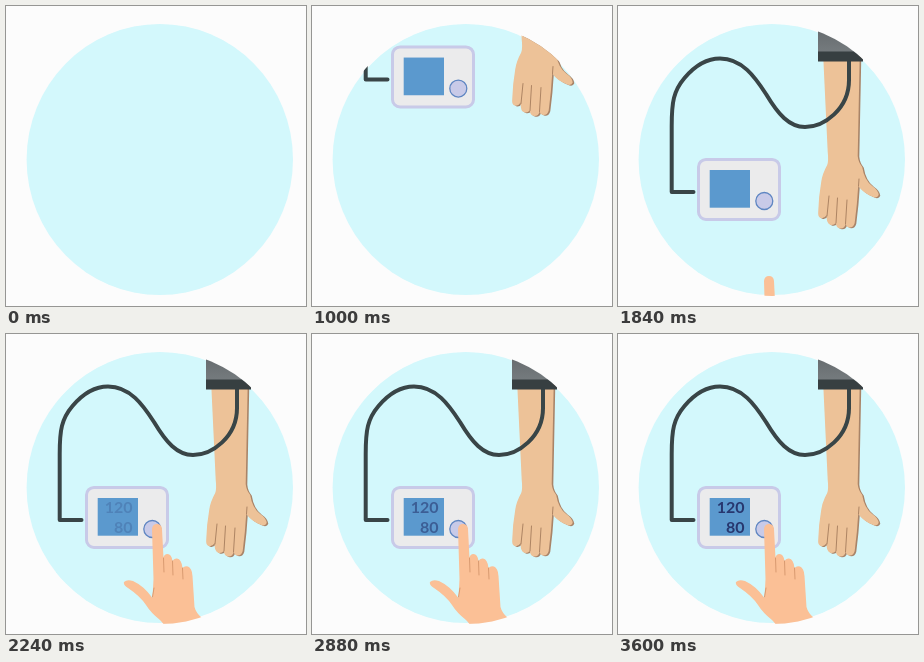
These frames come from a looping animation (300 by 300 pixels, 4 s). An HTML page:

```html
<!DOCTYPE html>
<html lang="en">
<head>
<meta charset="utf-8">
<title>Blood pressure</title>
<style>
  html, body { margin: 0; width: 100%; height: 100%; overflow: hidden; background: #fcfcfc; }
  svg { display: block; width: 100%; height: 100%; }
  text { font: bold 16px Lato, sans-serif; text-anchor: end; fill: #27376f; }
  .crease { fill: none; stroke-width: 1; stroke-linecap: round; }
</style>
</head>
<body>
<svg viewBox="0 0 300 300">
  <defs>
    <clipPath id="disc"><ellipse cx="153.800" cy="153.500" rx="134.500" ry="136.500"/></clipPath>
    <linearGradient id="sleeve" x2="0" y2="1">
      <stop stop-color="#575b5e"/><stop offset="1" stop-color="#757b7e"/>
    </linearGradient>
    <path id="arm" d="M206 50H242.500L240.500 150Q241 156 245 161Q247 174 255 180Q261 184 261.500 189Q260 193 255 190.500Q246 187 241 180Q240 198 237.500 217Q236 222 232 221.500Q229 221 228.500 218Q227 223 223 222.500Q219 222 218.500 217Q216 220 212.500 218.500Q209 217 209.500 209Q207 213 203.500 212Q200.500 211 201 206Q201.500 190 204 176Q205 168 210 159Q211.500 155 210.500 146Z"/>
  </defs>
  <ellipse cx="153.800" cy="153.500" rx="133.200" ry="135.500" fill="#d3f8fc"/>
  <g clip-path="url(#disc)">
    <g id="kit">
      <!-- shaded edge, then skin -->
      <use href="#arm" x="0.800" y="0.700" fill="#a98468"/>
      <use href="#arm" x="-0.800" fill="#edc298"/>
      <path class="crease" stroke="#ad8463" d="M209 210L211 190M218 217L219.500 192M227.500 218L229 194M240.500 180L241 173"/>

      <path fill="none" stroke="#394547" stroke-width="4" stroke-linecap="round" stroke-linejoin="round" d="M75.500 186H53.700V120C53.700 96 55.500 85 66.500 72C77.500 59 90 52.500 102 52.500C124 52.500 137 71 148 88C160 108 171 121 187 121C206 121 231 103 231 74V54"/>
      <rect x="200" y="0" width="45" height="46" fill="url(#sleeve)"/>
      <rect x="200" y="45.500" width="45" height="10" fill="#373f41"/>

      <rect x="80.500" y="153.400" width="81" height="60" rx="7.500" fill="#ebebec" stroke="#c8cae8" stroke-width="3"/>
      <rect x="91.700" y="164" width="40.300" height="37.700" fill="#5b99ce"/>
      <circle cx="146.300" cy="195" r="8.500" fill="#c8cae8" stroke="#5f86c2" stroke-width="1.300"/>
    </g>

    <g id="reading">
      <text x="126.500" y="179">120</text>
      <text x="126.500" y="199">80</text>
    </g>

    <g id="finger">
      <path fill="#fbc096" d="M146 195Q146.500 190 151 190Q155.500 190 156 195L157.500 224Q158 220 161.500 220Q165.500 220 166.500 227Q168 224 171 224.500Q175.500 225 176.500 234Q178.500 231.500 182 232.500Q186 234 186.500 242L188.500 273Q190 279 196 284L206 300H163Q160 292 154 286Q145 279 140 271Q134 262 122 254Q117 251 118 248Q121 245 127 247Q138 252 146.500 264L147.500 245Z"/>
      <path class="crease" stroke="#d99a70" d="M157.500 224L158 238M166.500 227L167 241M176.500 234L177 245M146.500 263L148 254"/>
    </g>
  </g>
</svg>
<script>
  const LOOP = 4000, STEP = 40;
  const kit = document.getElementById('kit');
  const finger = document.getElementById('finger');
  const reading = document.getElementById('reading');

  const moveY = (part, y) => part.setAttribute('transform', `translate(0 ${y})`);
  const clamp = v => Math.max(0, Math.min(1, v));

  function draw(now) {
    const t = Math.floor((now % LOOP) / STEP) * STEP;
    moveY(kit, Math.min(0, (t - 1346) * 0.325));
    moveY(finger, Math.max(0, (2000 - t) * 0.5));
    reading.setAttribute('opacity', clamp((t - 1840) / 1760));
  }

  let start;
  function tick(now) {
    start ??= now;
    draw(now - start);
    requestAnimationFrame(tick);
  }
  draw(0);
  requestAnimationFrame(tick);
</script>
</body>
</html>
```
